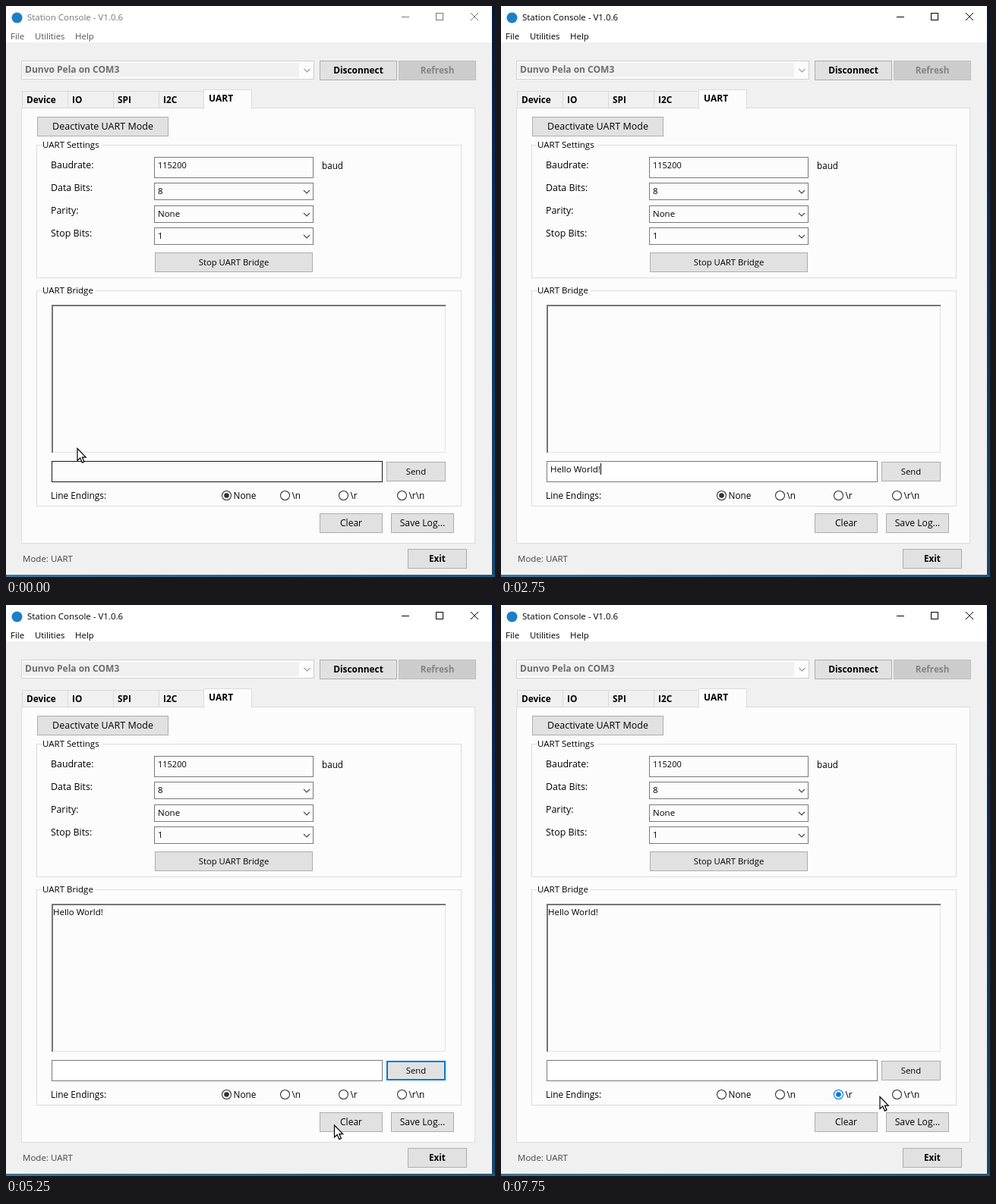
An HTML page with a canvas that plays this animation: 644x753 px, repeating every 8 s.

```html
<!DOCTYPE html>
<html lang="en">
<head>
<meta charset="utf-8">
<title>Station Console</title>
<style>
  html, body { margin: 0; width: 100%; height: 100%; overflow: hidden; background: #f0f0f0; }
  canvas { display: block; }
</style>
</head>
<body>
<canvas id="stage" width="644" height="753"></canvas>
<script>
const ctx = document.getElementById('stage').getContext('2d');
const LOOP = 8000, STEP = 250;
const FAMILY = '"Open Sans", "Noto Sans", sans-serif';
const BLUE = '#0078d7', FIELD = '#7a7a7a', PAGE = '#fcfcfc', FACE = '#f0f0f0';
const MESSAGE = 'Hello World!';
const ENDINGS = ['None', '\\n', '\\r', '\\r\\n'];

// Pointer path: time, x, y
const PATH = [
  [0, 93.5, 583], [250, 131, 619], [3250, 131, 619], [3500, 330, 614],
  [3750, 524, 608], [4500, 530, 603], [4750, 520, 620], [5750, 344, 751],
  [6000, 345, 738], [6500, 364, 650], [7000, 372, 650], [7250, 438.5, 649],
  [7500, 446, 648], [7750, 498.5, 648]
];

function pointerAt(t) {
  const i = PATH.findIndex(k => k[0] >= t);
  if (i <= 0) return PATH[i < 0 ? PATH.length - 1 : 0].slice(1);
  const [t0, x0, y0] = PATH[i - 1], [t1, x1, y1] = PATH[i];
  const k = (t - t0) / (t1 - t0);
  return [x0 + (x1 - x0) * k, y0 + (y1 - y0) * k];
}

function rect(x, y, w, h, color) {
  ctx.fillStyle = color;
  ctx.fillRect(x, y, w, h);
}

function box(x, y, w, h, fill, border, line = 1) {
  rect(x, y, w, h, border);
  rect(x + line, y + line, w - 2 * line, h - 2 * line, fill);
}

function setFont(size, bold) {
  ctx.font = `${bold ? 700 : 400} ${size}px ${FAMILY}`;
}

// x is the left ink edge, y the middle of the capitals
function text(str, x, y, { size = 11.5, bold = false, color = '#000', align = 'left' } = {}) {
  setFont(size, bold);
  ctx.textAlign = align;
  ctx.fillStyle = color;
  ctx.fillText(str, align === 'left' ? x - 1 : x, y + 4);
}

function lines(points, color, width = 1) {
  ctx.beginPath();
  points.forEach(([x, y], i) => i ? ctx.lineTo(x, y) : ctx.moveTo(x, y));
  ctx.strokeStyle = color;
  ctx.lineWidth = width;
  ctx.stroke();
}

function button(label, x, y, w, h, opts = {}) {
  const { fill = '#e1e1e1', border = '#adadad', line = 1, ...font } = opts;
  box(x, y, w, h, fill, border, line);
  text(label, x + w / 2, y + h / 2, { ...font, align: 'center' });
}

function chevron(x, y, color) {
  lines([[x - 4, y - 2], [x, y + 2], [x + 4, y - 2]], color, 1.1);
}

function combo(value, y) {
  box(195, y, 210, 23, PAGE, FIELD);
  text(value, 201, y + 11);
  chevron(396, y + 12, '#444');
}

function group(label, y, h, gapEnd) {
  ctx.strokeStyle = '#dcdcdc';
  ctx.lineWidth = 1;
  ctx.strokeRect(40.5, y + .5, 559, h);
  rect(47, y, gapEnd - 47, 1, PAGE);
  text(label, 49, y);
}

function titleBar(active) {
  const color = active ? '#000' : '#777';
  rect(0, 0, 640, 48, '#fff');
  ctx.fillStyle = '#1b7fc8';
  ctx.beginPath();
  ctx.arc(14.5, 15.5, 7, 0, 7);
  ctx.fill();
  text('Station Console - V1.0.6', 29, 15, { color });
  lines([[521, 14.5], [531, 14.5]], color);
  ctx.strokeRect(566.5, 9.5, 9, 9);
  lines([[612, 9], [622, 19]], color);
  lines([[622, 9], [612, 19]], color);
  const menu = active ? '#000' : '#555';
  text('File', 7, 40, { color: menu });
  text('Utilities', 39, 40, { size: 11.3, color: menu });
  text('Help', 92, 40, { color: menu });
}

function desktop() {
  const side = ctx.createLinearGradient(0, 0, 0, 753);
  side.addColorStop(0, '#06172f');
  side.addColorStop(.35, '#0b2a5c');
  side.addColorStop(1, '#17486f');
  rect(640, 0, 4, 753, side);
  const base = ctx.createLinearGradient(0, 0, 644, 0);
  base.addColorStop(0, '#3d7395');
  base.addColorStop(1, '#24577c');
  rect(0, 750, 644, 3, base);
}

function deviceBar() {
  box(20, 72, 386, 25, PAGE, '#d0d0d0');
  rect(22, 75, 364, 19, FACE);
  text('Dunvo Pela on COM3', 26, 84, { size: 12, bold: true, color: '#6d6d6d' });
  chevron(396.5, 85, '#999');
  button('Disconnect', 413, 72, 102, 26, { size: 11.9, bold: true });
  button('Refresh', 517, 72, 102, 26,
    { size: 11.7, bold: true, fill: '#ccc', border: '#bfbfbf', color: '#838383' });
}

function tabs() {
  box(20, 134, 598, 575, PAGE, '#dcdcdc');
  ['Device', 'IO', 'SPI', 'I2C'].forEach((label, i) => {
    const x = 21 + i * 60;
    box(x, 112, 61, 23, FACE, '#d9d9d9');
    text(label, x + 7, 124, { size: 11.8, bold: true });
  });
  box(260, 110, 64, 26, PAGE, '#dcdcdc');
  rect(261, 134, 62, 3, PAGE);
  text('UART', 268, 122, { size: 12, bold: true });
}

function settings() {
  button('Deactivate UART Mode', 41, 146, 173, 26, { size: 12.5 });
  group('UART Settings', 183, 175, 127);
  ['Baudrate:', 'Data Bits:', 'Parity:', 'Stop Bits:'].forEach((label, i) =>
    text(label, 60, 210 + i * 30, { size: 12.4 }));
  box(195, 199, 210, 28, PAGE, FIELD);
  text('115200', 201, 210, { size: 11 });
  text('baud', 417, 211, { size: 11.7 });
  combo('8', 233);
  combo('None', 263);
  combo('1', 292);
  button('Stop UART Bridge', 196, 325, 208, 26, { size: 11.3 });
}

function radio(i, t, chosen) {
  const x = 290.5 + i * 77, y = 645.5, on = chosen === i;
  const hover = (i === 1 && t >= 6500 && t < 7250) || (i === 2 && t >= 7250);
  const color = hover ? BLUE : i === 1 && t === 7250 ? '#164a7c' : '#333';
  ctx.beginPath();
  ctx.arc(x, y, 6, 0, 7);
  ctx.fillStyle = '#fff';
  ctx.fill();
  ctx.strokeStyle = color;
  ctx.lineWidth = 1.1;
  ctx.stroke();
  if (on) {
    ctx.beginPath();
    ctx.arc(x, y, 3.3, 0, 7);
    ctx.fillStyle = color;
    ctx.fill();
  }
  text(ENDINGS[i], x + 10, 646, { size: 11.8 });
}

function logBox(t) {
  box(60, 394, 519, 195, PAGE, '#e3e3e3');
  rect(60, 394, 519, 2, '#757575');
  rect(60, 394, 2, 195, '#757575');
  if (t >= 4250) text(MESSAGE, 63, 405);
}

function inputBox(t) {
  const border = t < 500 ? '#171717' : t < 750 ? BLUE : FIELD;
  box(60, 600, 436, 28, t < 750 ? PAGE : '#fff', border);
  if (t < 500 || t >= 4250) return;
  const count = t < 1250 ? 0 : t < 1750 ? 2 : Math.min(12, 4 + 2 * (t - 1750) / STEP);
  const typed = MESSAGE.slice(0, count);
  text(typed, 66, 611);
  setFont(11.5);
  const caret = count ? 65 + Math.round(ctx.measureText(typed).width) : 66;
  if (t < 4000) rect(caret, 603, 1, 15, '#000');
}

function sendButton(t) {
  let look = {};
  if (t === 4000) look = { fill: '#cce4f7', border: '#005499' };
  else if (t >= 3750 && t <= 4500) look = { fill: '#e5f1fb', border: BLUE };
  else if (t > 4500 && t < 6750) look = { border: BLUE, line: 2 };
  button('Send', 501, 601, 78, 26, { size: 11.3, ...look });
}

function bridge(t) {
  group('UART Bridge', 375, 284, 118);
  logBox(t);
  inputBox(t);
  sendButton(t);
  text('Line Endings:', 60, 646, { size: 11.9 });
  const chosen = t < 6750 ? 0 : t < 7500 ? 1 : 2;
  ENDINGS.forEach((_, i) => radio(i, t, chosen));
  button('Clear', 413, 669, 83, 26, { size: 12 });
  button('Save Log...', 507, 669, 83, 26, { size: 12.2 });
}

function beam(x, y) {
  lines([[x - 3, y - 8.5], [x + 4, y - 8.5]], '#fff');
  lines([[x + .5, y - 8], [x + .5, y + 8]], '#fff');
  lines([[x - 3, y + 7.5], [x + 4, y + 7.5]], '#fff');
}

function arrow(x, y) {
  ctx.save();
  ctx.translate(x + .5, y + .5);
  ctx.beginPath();
  ctx.moveTo(0, 0);
  [[0, 16], [3.7, 12.6], [6.4, 18.6], [9, 17.4], [6.4, 11.6], [11.2, 11.6]]
    .forEach(p => ctx.lineTo(...p));
  ctx.closePath();
  ctx.fillStyle = '#fff';
  ctx.fill();
  ctx.strokeStyle = '#000';
  ctx.lineWidth = 1.2;
  ctx.stroke();
  ctx.restore();
}

function pointer(t) {
  if (t >= 1250 && t < 3500) return;
  const inField = (t >= 250 && t < 1250) || t === 3500;
  (inField ? beam : arrow)(...pointerAt(t));
}

function draw(now) {
  const t = Math.floor(now % LOOP / STEP) * STEP;
  rect(0, 0, 644, 753, FACE);
  titleBar(t >= 500);
  desktop();
  deviceBar();
  tabs();
  settings();
  bridge(t);
  text('Mode: UART', 23, 729, { color: '#444' });
  button('Exit', 529, 716, 78, 26, { size: 11.6, bold: true });
  pointer(t);
}

let start;
function tick(now) {
  start ??= now;
  draw(now - start);
  requestAnimationFrame(tick);
}
requestAnimationFrame(tick);
</script>
</body>
</html>
```
